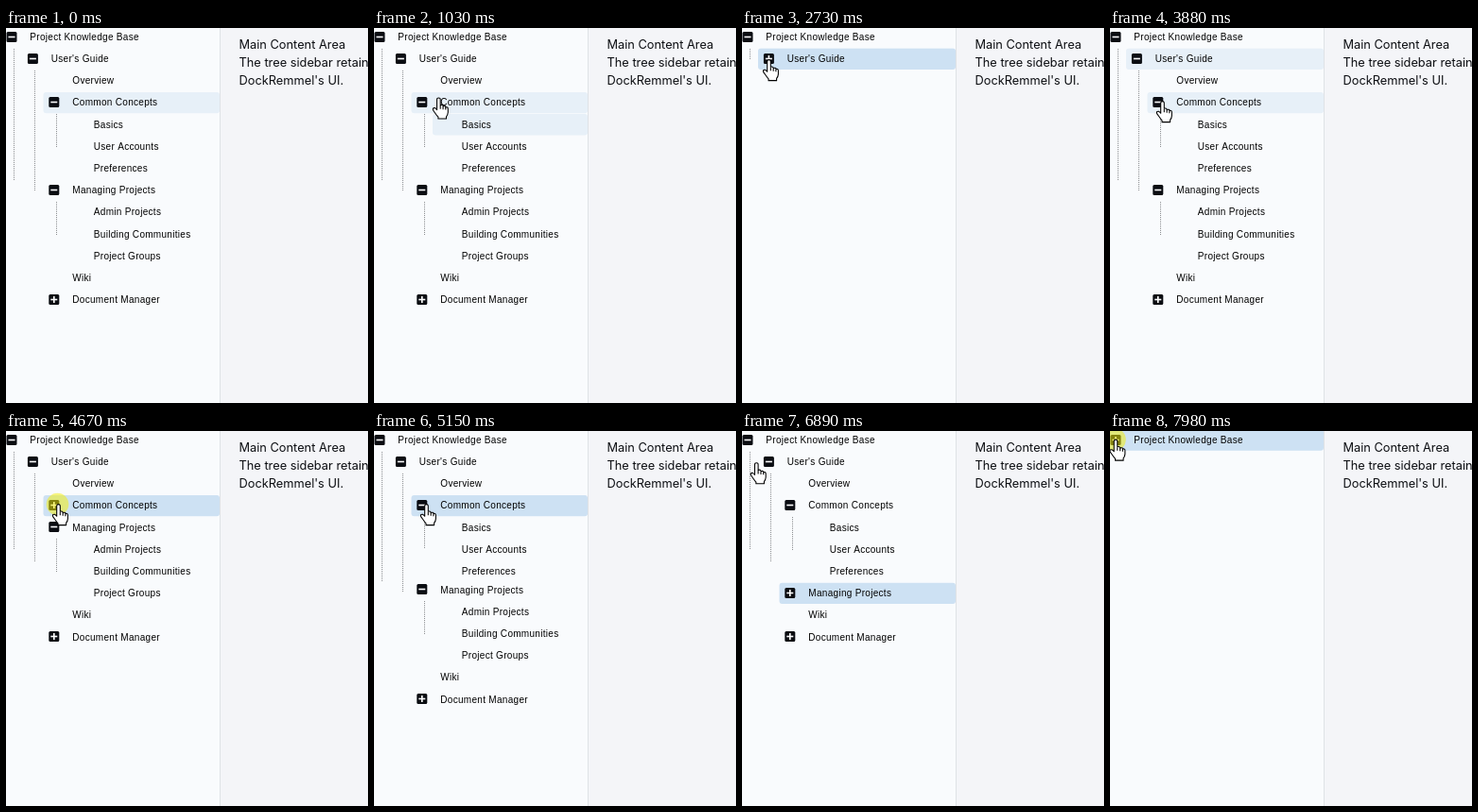
Write an HTML page with a canvas that moves like this. It is 383 by 397 pixels and loops after 8 s.

```html
<!DOCTYPE html>
<html lang="en">
<head>
<meta charset="utf-8">
<title>Tree sidebar</title>
<style>
  html, body { margin: 0; width: 100%; height: 100%; overflow: hidden; background: #f4f5f8; }
  canvas { display: block; }
</style>
</head>
<body>
<canvas id="stage" width="383" height="397"></canvas>
<script>
const ctx = document.getElementById('stage').getContext('2d');
const LOOP = 8000, ROW = 23.18, TOP = -2, INDENT = 22.5, SIDEBAR = 226;
const HOVER = '#e7f0f8', SELECTED = '#cde1f3';
const HOVER_LAG = 50;

const node = (label, ...kids) => ({ label, kids, toggles: [] });
const common = node('Common Concepts', node('Basics'), node('User Accounts'), node('Preferences'));
const managing = node('Managing Projects', node('Admin Projects'), node('Building Communities'), node('Project Groups'));
const documents = node('Document Manager', node(''));
const guide = node("User's Guide", node('Overview'), common, managing, node('Wiki'), documents);
const root = node('Project Knowledge Base', guide);

// Each toggle: start, end, openness reached
documents.toggles = [[0, 0, 0]];
guide.toggles = [[1980, 2270, 0], [2860, 3130, 1]];
common.toggles = [[4190, 4430, 0], [4860, 5200, 1]];
managing.toggles = [[6300, 6550, 0]];
root.toggles = [[7380, 7630, 0]];

const selection = [
  [0, common, HOVER], [1870, guide, SELECTED], [3820, guide, HOVER],
  [4180, common, SELECTED], [6130, common, HOVER], [6230, managing, SELECTED],
  [6950, managing, HOVER], [7300, root, SELECTED]
];
const clicks = [[1730, 1870], [2600, 2730], [4110, 4180], [4670, 4740], [6020, 6100], [7230, 7300], [7980, 8000]];

// Pointer tip: time, x, y
const pointer = [
  [400, 314, 356], [650, 223, 214], [870, 223, 214], [980, 98, 103], [1030, 68.5, 75],
  [1300, 38, 46], [1520, 28.5, 34.5], [3350, 28.5, 34.5], [3550, 55, 79], [3820, 55, 79],
  [3880, 55.5, 78.5], [5480, 55.5, 78.5], [5830, 54.5, 168], [5980, 54.5, 175],
  [6620, 54.5, 175], [6900, 14, 30], [7030, 6, 10]
];

const hand = new Path2D('M-2 13V1Q-2-1 0-1Q2-1 2 1V7.5Q5 6.5 5.3 9Q8 7.7 8.3 10Q11 9.3 11 12V16Q10.8 19 9 21V23.5H-.5V21.5Q-2 20-4 17L-6.5 13.5Q-7.5 10.5-4.5 10.8Q-3 11.5-2 13Z');
const fingers = new Path2D('M2 8V12M5.2 9V12.5M8.2 10V13');
const arrow = new Path2D('M0 0V17L4 13.5L7 20L9.5 19L6.7 12.5H12Z');

const lerp = (a, b, p) => a + (b - a) * p;
const ease = p => 0.5 - Math.cos(Math.PI * p) / 2;

function pointerAt(t) {
  if (t < pointer[0][0]) return null;
  const i = pointer.findIndex(k => k[0] > t);
  if (i < 0) return pointer.at(-1).slice(1);
  const [a, b] = [pointer[i - 1], pointer[i]];
  const p = (t - a[0]) / (b[0] - a[0]);
  return [lerp(a[1], b[1], p), lerp(a[2], b[2], p)];
}

function openness(item, t) {
  let value = item.kids.length ? 1 : 0;
  for (const [start, end, to] of item.toggles) {
    if (t >= end) value = to;
    else if (t >= start) value = lerp(value, to, ease((t - start) / (end - start)));
  }
  return value;
}

const isOpen = (item, t) => {
  const last = item.toggles.filter(k => k[0] <= t).at(-1);
  return last ? last[2] === 1 : true;
};

const kidsHeight = (item, t) => {
  const open = openness(item, t);
  return open && open * item.kids.reduce((sum, kid) => sum + ROW + kidsHeight(kid, t), 0);
};

function drawToggle(x, y, open) {
  ctx.fillStyle = '#0b0d12';
  ctx.beginPath();
  ctx.roundRect(x - 5.5, y - 5.5, 11, 11, 1.5);
  ctx.fill();
  ctx.fillStyle = '#fff';
  ctx.fillRect(x - 3.5, y - 0.8, 7, 1.6);
  if (!open) ctx.fillRect(x - 0.8, y - 3.5, 1.6, 7);
}

function drawNode(item, level, y, scene) {
  const { t, hover, selected } = scene;
  const left = -5.5 + INDENT * level, middle = y + ROW / 2;
  const fill = item === selected[1] ? selected[2] : item === hover ? HOVER : null;
  if (fill) {
    ctx.fillStyle = fill;
    ctx.beginPath();
    ctx.roundRect(left, y + 0.4, SIDEBAR - left, 22.4, 3);
    ctx.fill();
  }
  if (item.kids.length) drawToggle(6 + 22.4 * level, Math.round(middle) - 0.5, isOpen(item, t));
  ctx.fillStyle = '#000';
  ctx.font = '10px "Liberation Sans", Arial, sans-serif';
  ctx.letterSpacing = '0.3px';
  ctx.fillText(item.label, 25.3 + INDENT * level, Math.round(middle + 3.3));

  const height = kidsHeight(item, t);
  if (!height) return;
  const below = y + ROW;
  ctx.fillStyle = '#8b8d90';
  const lineX = Math.floor(8 + INDENT * level);
  for (let dot = Math.ceil(below); dot < below + height / 2; dot += 2) ctx.fillRect(lineX, dot, 1, 1);

  ctx.save();
  ctx.beginPath();
  ctx.rect(0, below, SIDEBAR, height);
  ctx.clip();
  let kidY = below;
  for (const kid of item.kids) {
    drawNode(kid, level + 1, kidY, scene);
    kidY += ROW + kidsHeight(kid, t);
  }
  ctx.restore();
}

function nodeAt(item, level, y, point, t) {
  const [px, py] = point;
  if (py >= y && py < y + ROW) return px >= -5.5 + INDENT * level && px < SIDEBAR ? item : null;
  let kidY = y + ROW;
  if (py >= kidY + kidsHeight(item, t)) return null;
  for (const kid of item.kids) {
    const height = ROW + kidsHeight(kid, t);
    if (py >= kidY && py < kidY + height) return nodeAt(kid, level + 1, kidY, point, t);
    kidY += height;
  }
  return null;
}

function drawPointer(x, y) {
  const overTree = x < SIDEBAR;
  const shape = overTree ? hand : arrow;
  ctx.save();
  ctx.translate(x, y);
  ctx.scale(0.9, 0.9);
  ctx.fillStyle = '#fff';
  ctx.strokeStyle = '#000';
  ctx.lineWidth = 1.2;
  ctx.lineJoin = 'round';
  ctx.fill(shape);
  ctx.stroke(shape);
  if (overTree) ctx.stroke(fingers);
  ctx.restore();
}

function draw(t) {
  ctx.fillStyle = '#f9fbfd';
  ctx.fillRect(0, 0, SIDEBAR, 397);
  ctx.fillStyle = '#f4f5f8';
  ctx.fillRect(SIDEBAR, 0, 157, 397);
  ctx.fillStyle = '#dfe2e6';
  ctx.fillRect(SIDEBAR, 0, 1, 397);

  ctx.fillStyle = '#0c0e12';
  ctx.font = '12.8px Inter, sans-serif';
  ctx.letterSpacing = '0px';
  ['Main Content Area', 'The tree sidebar retains', "DockRemmel's UI."]
    .forEach((line, i) => ctx.fillText(line, 246.5, 22 + 19 * i));

  const earlier = pointerAt(t - HOVER_LAG);
  const hover = earlier && nodeAt(root, 0, TOP, earlier, t);
  const selected = selection.filter(s => s[0] <= t).at(-1);
  drawNode(root, 0, TOP, { t, hover, selected });

  const tip = pointerAt(t);
  if (!tip) return;
  if (clicks.some(([on, off]) => t >= on && t < off)) {
    ctx.fillStyle = 'rgba(243, 238, 10, 0.52)';
    ctx.beginPath();
    ctx.arc(tip[0] - 1, tip[1] - 1, 11.8, 0, 2 * Math.PI);
    ctx.fill();
  }
  drawPointer(...tip);
}

function tick() {
  draw(performance.now() % LOOP);
  requestAnimationFrame(tick);
}
tick();
</script>
</body>
</html>
```
